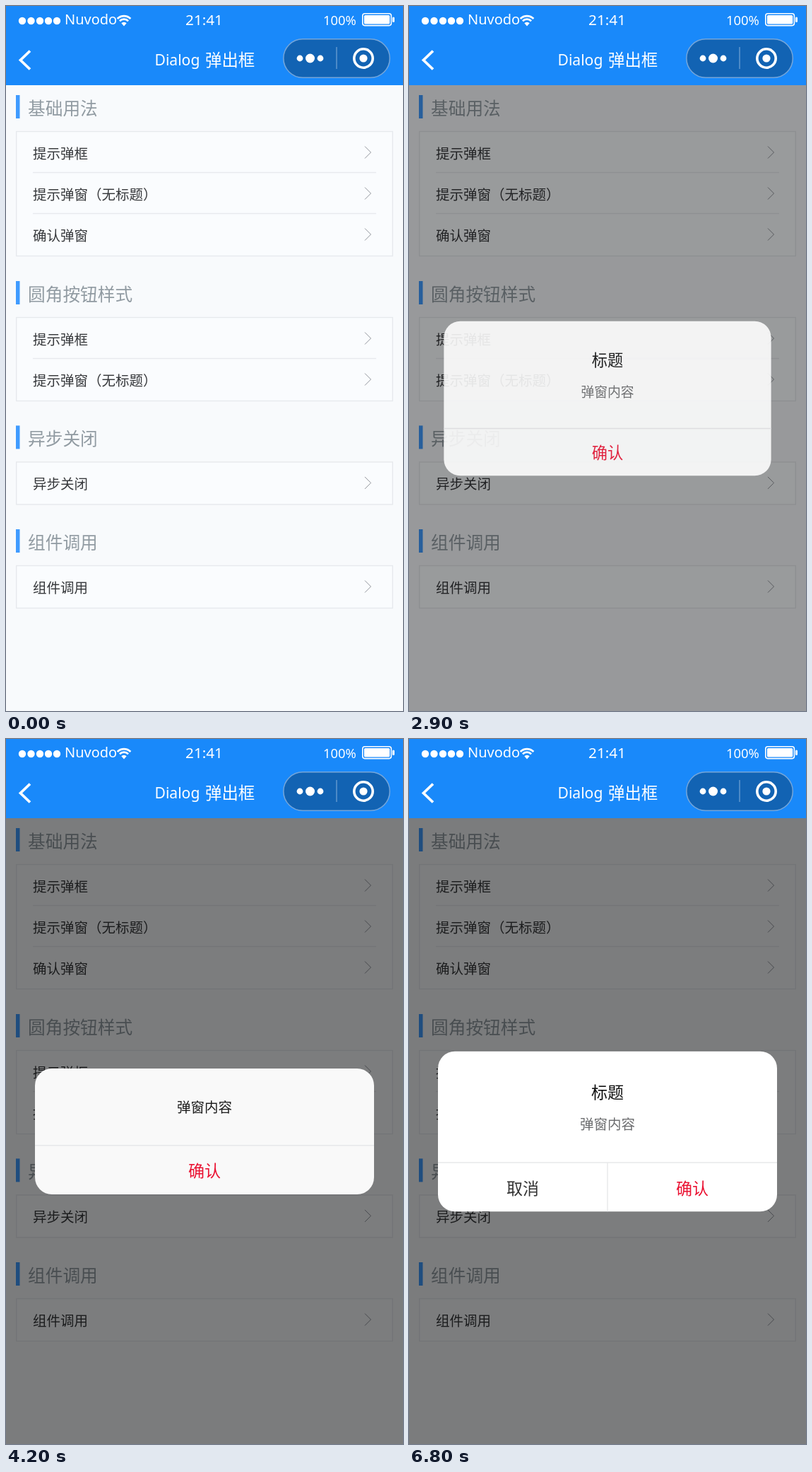
Animation, 562 px wide and 997 px high, one loop 8000 ms. Source, as an HTML page:

```html
<!DOCTYPE html>
<html lang="zh-CN">
<head>
<meta charset="utf-8">
<style>
  html, body { margin: 0; height: 100%; overflow: hidden; background: #f8fafc; }
  svg { display: block; }
  text { font-family: "Noto Sans CJK SC", "Noto Sans CJK", sans-serif; }
  .latin { font-family: "Noto Sans", "Open Sans", sans-serif; }
  .title { font-weight: 500; }
</style>
</head>
<body>
<svg id="stage" width="562" height="997" viewBox="0 0 562 997"></svg>
<script>
const WIDTH = 562, HEIGHT = 997, LOOP = 8000, STEP = 100, FADE = 300;
const CLOSE_LEAD = 50, DIALOG_LAG = 16, MIDDLE = 555;
const stage = document.getElementById('stage');

// Chinese text, centred vertically on y
const label = (x, y, size, fill, str, anchor = 'start') =>
  `<text x="${x}" y="${y + size * 0.38}" font-size="${size}" fill="${fill}" text-anchor="${anchor}">${str}</text>`;
const latin = (x, y, size, str, anchor = 'start') =>
  `<text class="latin" x="${x}" y="${y}" font-size="${size}" fill="#fff" text-anchor="${anchor}">${str}</text>`;
const rect = (x, y, w, h, attrs) => `<rect x="${x}" y="${y}" width="${w}" height="${h}" ${attrs}/>`;
const circle = (x, y, r, attrs = 'fill="#fff"') => `<circle cx="${x}" cy="${y}" r="${r}" ${attrs}/>`;
const line = (d, color, width) => `<path d="${d}" fill="none" stroke="${color}" stroke-width="${width}"/>`;

function section(top, title, rows) {
  const boxTop = top + 51.5;
  const items = rows.map((row, i) => {
    const y = top + 82.2 + 58 * i;
    return (i ? line(`M38 ${y - 30.7}H524`, '#e8eaee', 1.3) : '') +
      label(38, y, 19.5, '#36383b', row) +
      line(`M508 ${y - 9.7}l8.5 8.5l-8.5 8.5`, '#8f939a', 1);
  });
  return rect(14, top, 5.5, 33, 'fill="#3f9bff"') +
    label(31, top + 18.6, 24.7, '#919ba2', title) +
    rect(14.7, boxTop, 532.6, 58 * rows.length + 2, 'fill="#fafcfe" stroke="#e6e9ed" stroke-width="1.4"') +
    items.join('');
}

function header() {
  const wifiArc = r => line(`M${167 - r * 0.72} ${27 - r * 0.69}A${r} ${r} 0 0 1 ${167 + r * 0.72} ${27 - r * 0.69}`, '#fff', 2.7);
  return rect(0, 0, WIDTH, 112, 'fill="#1989fa"') +
    [23, 35.5, 48, 60, 72].map(x => circle(x, 21, 5.2)).join('') +
    latin(83, 26, 20, 'Nuvodo') +
    wifiArc(13) + wifiArc(8.4) + '<path d="M167 28.5l-3.7-4.2a5 5 0 0 1 7.4 0z" fill="#fff"/>' +
    latin(280.5, 26.5, 20.7, '21:41', 'middle') +
    latin(449, 27, 18.4, '100%') +
    rect(504.8, 10.8, 40.6, 16.8, 'rx="3" fill="none" stroke="#fff" stroke-width="1.6"') +
    rect(507, 13, 36.2, 12.4, 'rx="1.5" fill="#fff"') +
    rect(547, 15.5, 3, 7.5, 'rx="1.5" fill="#fff"') +
    line('M34 63.5L20.5 76.5L34 89.5', '#fff', 3.8) +
    `<g class="title">${latin(210.5, 84, 21.1, 'Dialog')}${label(282, 76, 23.4, '#fff', '弹出框')}</g>` +
    rect(392.8, 46.8, 150.5, 54.4, 'rx="27.2" fill="#1263b3" stroke="#75a6da" stroke-width="1.5"') +
    circle(416, 74, 4.4) + circle(430.5, 74, 6.5) + circle(445, 74, 4.4) +
    line('M468 58V89', '#5c94cc', 1.6) +
    circle(506, 74, 13.2, 'fill="none" stroke="#fff" stroke-width="3.6"') + circle(506, 74, 5.6);
}

function dialog({ title, cancel, fill }) {
  const half = title ? 113.3 : 89;
  const rule = MIDDLE + half - 69.3, buttonY = MIDDLE + half - 33.5;
  const content = title
    ? label(281, 499, 23, '#111', '标题', 'middle') + label(281, 545, 19.5, '#6b6c6e', '弹窗内容', 'middle')
    : label(281, 520.5, 19.5, '#1c1c1c', '弹窗内容', 'middle');
  return '<g class="dialog">' +
    rect(41, MIDDLE - half, 480, half * 2, `rx="24" fill="${fill}"`) + content +
    line(`M41 ${rule}H521`, '#e7e8ea', 1.4) +
    (cancel ? line(`M281 ${rule}V${MIDDLE + half}`, '#e7e8ea', 1.4) + label(161, buttonY, 23, '#333', '取消', 'middle') : '') +
    label(cancel ? 401 : 281, buttonY, 23, '#ea1232', '确认', 'middle') + '</g>';
}

// lead: how far the opening transition has run at its first visible step
const dialogs = [
  { open: 1300, lead: 118, close: 2900, title: true, fill: '#fff' },
  { open: 3900, lead: 25, close: 5400, fill: '#f9f9f9' },
  { open: 6500, lead: 18, close: LOOP + FADE, title: true, cancel: true, fill: '#fff' }
];

stage.innerHTML =
  rect(0, 0, WIDTH, HEIGHT, 'fill="#f8fafc"') +
  section(126, '基础用法', ['提示弹框', '提示弹窗（无标题）', '确认弹窗']) +
  section(389, '圆角按钮样式', ['提示弹框', '提示弹窗（无标题）']) +
  section(593.4, '异步关闭', ['异步关闭']) +
  section(740, '组件调用', ['组件调用']) +
  rect(0, 112, WIDTH, HEIGHT - 112, 'id="shade"') +
  dialogs.map(dialog).join('') + header();

const shade = document.getElementById('shade');
const groups = document.querySelectorAll('.dialog');

// CSS "ease": cubic-bezier(.25, .1, .25, 1)
function ease(x) {
  if (x <= 0) return 0;
  if (x >= 1) return 1;
  const bezier = (a, b, u) => 3 * a * u * (1 - u) ** 2 + 3 * b * u * u * (1 - u) + u ** 3;
  let lo = 0, hi = 1;
  for (let i = 0; i < 20; i++) {
    const mid = (lo + hi) / 2;
    if (bezier(0.25, 0.25, mid) < x) lo = mid; else hi = mid;
  }
  return bezier(0.1, 1, lo);
}

function visibility({ open, lead, close }, t, lag) {
  if (t < open) return 0;
  const leaving = t < close ? 0 : ease((t - close + CLOSE_LEAD - lag) / FADE);
  return ease((t - open + lead - lag) / FADE) - leaving;
}

function draw(now) {
  const t = Math.floor(now % LOOP / STEP) * STEP;
  let dim = 0;
  dialogs.forEach((d, i) => {
    dim += visibility(d, t, 0);
    const shown = visibility(d, t, DIALOG_LAG);
    const scale = 0.7 + 0.3 * shown;
    groups[i].setAttribute('opacity', shown);
    groups[i].setAttribute('transform', `translate(281 ${MIDDLE}) scale(${scale}) translate(-281 ${-MIDDLE})`);
  });
  shade.setAttribute('opacity', dim * 0.5);
}

const start = performance.now();
function tick() {
  draw(performance.now() - start);
  requestAnimationFrame(tick);
}
tick();
</script>
</body>
</html>
```
